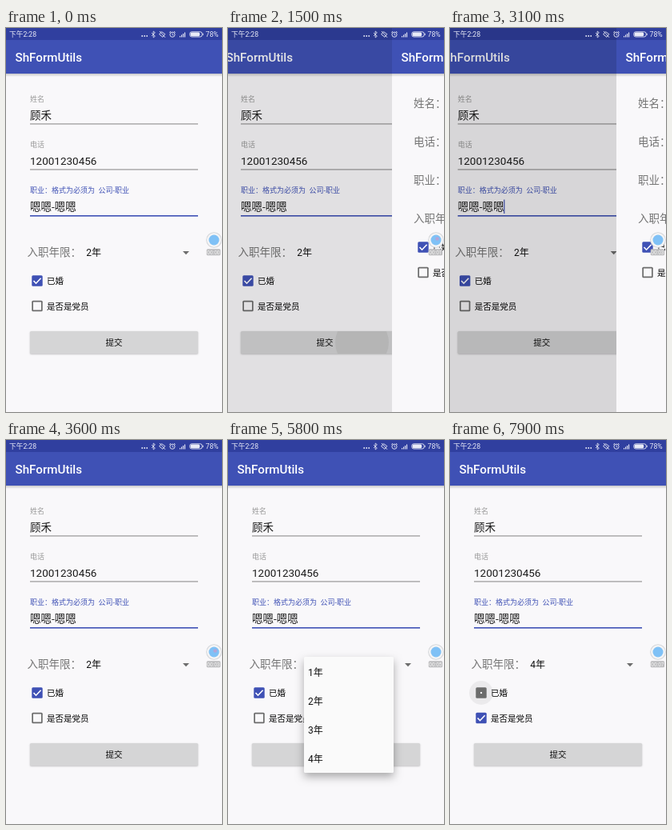
An HTML page with a canvas for the animation above (8000 ms loop, 270 by 480 pixels).

```html
<!DOCTYPE html>
<html lang="zh-CN">
<head>
<meta charset="utf-8">
<title>ShFormUtils</title>
<style>
html, body { margin: 0; width: 100%; height: 100%; overflow: hidden; background: #f9f8fa; }
canvas { display: block; width: 100vw; height: 100vh; }
</style>
</head>
<body>
<canvas id="stage"></canvas>
<script>
const W = 270, H = 480, LOOP = 8000;
const FONT = 'Roboto, "Noto Sans CJK SC", "Noto Sans CJK", sans-serif';
const BLUE = '#3f51b5', DARK = '#303f9f', PAPER = '#f9f8fa', GREY = '#757575', INK = '#1c1c1c';
const PERSON = '顾禾', PHONE = '12001230456', JOB = '嗯嗯-嗯嗯';

const canvas = document.getElementById('stage');
const g = canvas.getContext('2d');

const clamp = v => Math.max(0, Math.min(1, v));
const span = (t, from, length) => clamp((t - from) / length);
const ease = u => (1 - Math.cos(Math.PI * u)) / 2;
const within = (t, a, b) => t >= a && t < b;

function text(s, x, y, size, color, weight = 400, align = 'left') {
  g.font = `${weight} ${size}px ${FONT}`;
  g.textAlign = align;
  g.fillStyle = color;
  g.fillText(s, x, y);
}

function rect(x, y, w, h, color) {
  g.fillStyle = color;
  g.fillRect(x, y, w, h);
}

function round(x, y, w, h, r, color) {
  g.beginPath();
  g.roundRect(x, y, w, h, r);
  g.fillStyle = color;
  g.fill();
}

function disc(x, y, r, color) {
  g.beginPath();
  g.arc(x, y, r, 0, Math.PI * 2);
  g.fillStyle = color;
  g.fill();
}

function line(points, color, width) {
  g.beginPath();
  points.forEach(([x, y], i) => i ? g.lineTo(x, y) : g.moveTo(x, y));
  g.strokeStyle = color;
  g.lineWidth = width;
  g.stroke();
}

function shadow(color, blur, dy) {
  const k = canvas.width / W;
  g.shadowColor = color;
  g.shadowBlur = blur * k;
  g.shadowOffsetY = dy * k;
}

// state runs from 0 (empty) to 1 (ticked)
function checkbox(label, cy, state) {
  const cx = 39, on = state > 0.5;
  round(cx - 6.7, cy - 6.7, 13.4, 13.4, 1.5, on ? BLUE : '#6c6c6c');
  if (on) {
    g.save();
    g.beginPath();
    g.rect(cx - 6, cy - 6, 12 * (state * 2 - 1), 12);
    g.clip();
    line([[cx - 4.5, cy], [cx - 1.5, cy + 3.2], [cx + 4.6, cy - 3.2]], '#fff', 1.6);
    g.restore();
  } else {
    const hole = 5 * (1 - state * 2);
    rect(cx - hole, cy - hole, hole * 2, hole * 2, PAPER);
  }
  text(label, 51, cy + 4, 10.5, '#000');
}

function halo(cy, t, start) {
  const u = span(t, start, 200), fade = 1 - span(t, start + 300, 200);
  if (u > 0 && fade > 0) disc(39, cy, 15 * u, `rgba(0,0,0,${0.055 * fade})`);
}

function page() {
  rect(0, 0, W, H, PAPER);
  const soft = g.createLinearGradient(0, 57, 0, 61);
  soft.addColorStop(0, 'rgba(0,0,0,.2)');
  soft.addColorStop(1, 'rgba(0,0,0,0)');
  rect(0, 57, W, 4, soft);
  rect(0, 0, W, 15, DARK);
  rect(0, 15, W, 42, BLUE);
  text('ShFormUtils', 11.5, 42, 15.2, '#fff', 500);
}

function field(label, value, y, active) {
  text(label, 30, y, 9, active ? BLUE : '#9a9a9a');
  text(value, 30, y + 22, 13.5, INK);
  if (active) rect(30, y + 28, 210, 1.6, BLUE);
  else rect(30, y + 27.5, 210, 0.9, '#777');
}

function button(t) {
  g.save();
  shadow('rgba(0,0,0,.25)', 2, 0.8);
  round(30, 379, 210, 28, 1.5, '#d5d5d6');
  g.restore();
  const u = span(t, 1230, 270);
  if (u > 0 && t < 2000) {
    g.save();
    g.beginPath();
    g.rect(30, 379, 210, 28);
    g.clip();
    disc(181.5, 393, 33.5 * u, 'rgba(0,0,0,.06)');
    g.restore();
  }
  text('提交', 135, 397, 10.5, '#111', 400, 'center');
}

function menu(t, from, to) {
  const open = ease(span(t, from, 200)) * (1 - span(t, to, 150));
  if (open <= 0) return;
  g.save();
  g.globalAlpha = open;
  const height = 145 * ease(span(t, from, 200));
  g.save();
  shadow('rgba(0,0,0,.32)', 11, 5);
  round(95, 271, 112, height, 1.5, '#fafafa');
  g.restore();
  g.beginPath();
  g.rect(95, 271, 112, height);
  g.clip();
  for (let i = 0; i < 4; i++) text(`${i + 1}年`, 100, 294.5 + i * 36, 12, '#111');
  g.restore();
}

function caret(t) {
  if (t < 1300) return within(t, 300, 800);
  if (t < 3900) return within(t, 3000, 3500);
  return (within(t, 5050, 5500) || t > 6400) && (t - 100) % 1000 < 500;
}

function form(t) {
  page();
  field('姓名', PERSON, 92);
  field('电话', PHONE, 149);
  field('职业：格式为必须为  公司-职业', JOB, 206, true);
  if (caret(t)) rect(87.5, 214.5, 1.2, 17.5, BLUE);
  text('入职年限：', 26.6, 285.4, 13.5, GREY);
  const years = t < 4900 ? 2 : t < 6400 ? 3 : 4;
  text(`${years}年`, 100.3, 285.4, 12, '#111');
  g.beginPath();
  g.moveTo(221, 279);
  g.lineTo(229, 279);
  g.lineTo(225, 283.2);
  g.fillStyle = '#6c6c6c';
  g.fill();
  halo(316, t, 7650);
  halo(347.5, t, 7030);
  checkbox('已婚', 316, 1 - span(t, 7720, 300));
  checkbox('是否是党员', 347.5, span(t, 7100, 300));
  button(t);
  menu(t, 3900, 4900);
  menu(t, 5450, 6400);
}

function detail() {
  page();
  [['姓名：', PERSON], ['电话：', PHONE], ['职业：', JOB], ['入职年限：', '2年']].forEach(([label, value], i) => {
    const y = 98.5 + i * 48;
    text(label, 27, y, 13.5, GREY);
    text(value, i < 3 ? 67.5 : 94.5, y, 10.5, GREY);
  });
  checkbox('已婚', 274, 1);
  checkbox('是否是党员', 305.5, 0);
}

function statusBar() {
  const c = '#e9ebf7';
  text('下午2:28', 4, 11.3, 8.7, c);
  for (let i = 0; i < 3; i++) disc(170.2 + i * 3, 10, 0.9, c);
  line([[182, 6], [186.4, 10.2], [184.2, 12], [184.2, 4], [186.4, 5.8], [182, 10]], c, 0.8);
  // muted bell
  line([[191.6, 8], [194.4, 4.6], [198.8, 7.6], [196, 11.4], [191.6, 8]], c, 0.9);
  line([[192, 4], [199, 11.8]], c, 0.9);
  // alarm clock
  g.beginPath();
  g.arc(208, 8.2, 3.1, 0, Math.PI * 2);
  g.stroke();
  line([[208, 6.4], [208, 8.4], [209.4, 9]], c, 0.8);
  line([[204.3, 5.6], [206, 4.2]], c, 0.9);
  line([[210, 4.2], [211.7, 5.6]], c, 0.9);
  for (let i = 0; i < 4; i++) rect(217 + i * 2, 10 - i * 1.5, 1.1, 1.5 + i * 1.5, c);
  // battery
  g.beginPath();
  g.roundRect(229.8, 4.8, 15.4, 6.2, 2.4);
  g.stroke();
  round(230.6, 5.6, 11.6, 4.6, 1.6, c);
  rect(245.6, 6.7, 1, 2.4, c);
  text('78%', 249.5, 11.3, 8.7, c);
}

function recorder(t) {
  disc(260, 265, 9.8, '#cfd1d4');
  disc(260, 265, 9, '#f4f4f5');
  disc(260, 265, 6.5, '#7fc1f6');
  if (within(t, 1400, 2400) || within(t, 3500, 4400)) disc(261.5, 263.5, 2.3, 'rgba(222,140,190,.55)');
  round(250.7, 276.2, 17.4, 8, 1.5, '#bcbcbe');
  text(`00:0${Math.floor(t / 1000)}`, 259.4, 282.6, 6.5, '#f6f6f6', 400, 'center');
}

function shifted(x, draw) {
  g.save();
  g.translate(x, 0);
  draw();
  g.restore();
}

function draw(t) {
  const opening = t < 2500;
  const cover = opening ? ease(span(t, 1386.5, 350)) : 1 - ease(span(t, 2862, 350));
  // whole pixels keep the seam between the pages clean
  const edge = Math.round(W * (1 - cover));
  if (cover < 1) {
    shifted(-cover * (opening ? 58 : 89), () => form(t));
    if (cover > 0) rect(0, 0, W, H, `rgba(0,0,0,${cover * (opening ? 0.4 : 0.6)})`);
  }
  if (cover > 0) shifted(edge, detail);
  statusBar();
  recorder(t);
}

function resize() {
  const d = window.devicePixelRatio || 1;
  canvas.width = Math.round(innerWidth * d);
  canvas.height = Math.round(innerHeight * d);
}

const start = performance.now();
function tick() {
  g.setTransform(canvas.width / W, 0, 0, canvas.height / H, 0, 0);
  draw((performance.now() - start) % LOOP);
  requestAnimationFrame(tick);
}
addEventListener('resize', resize);
resize();
tick();
</script>
</body>
</html>
```
